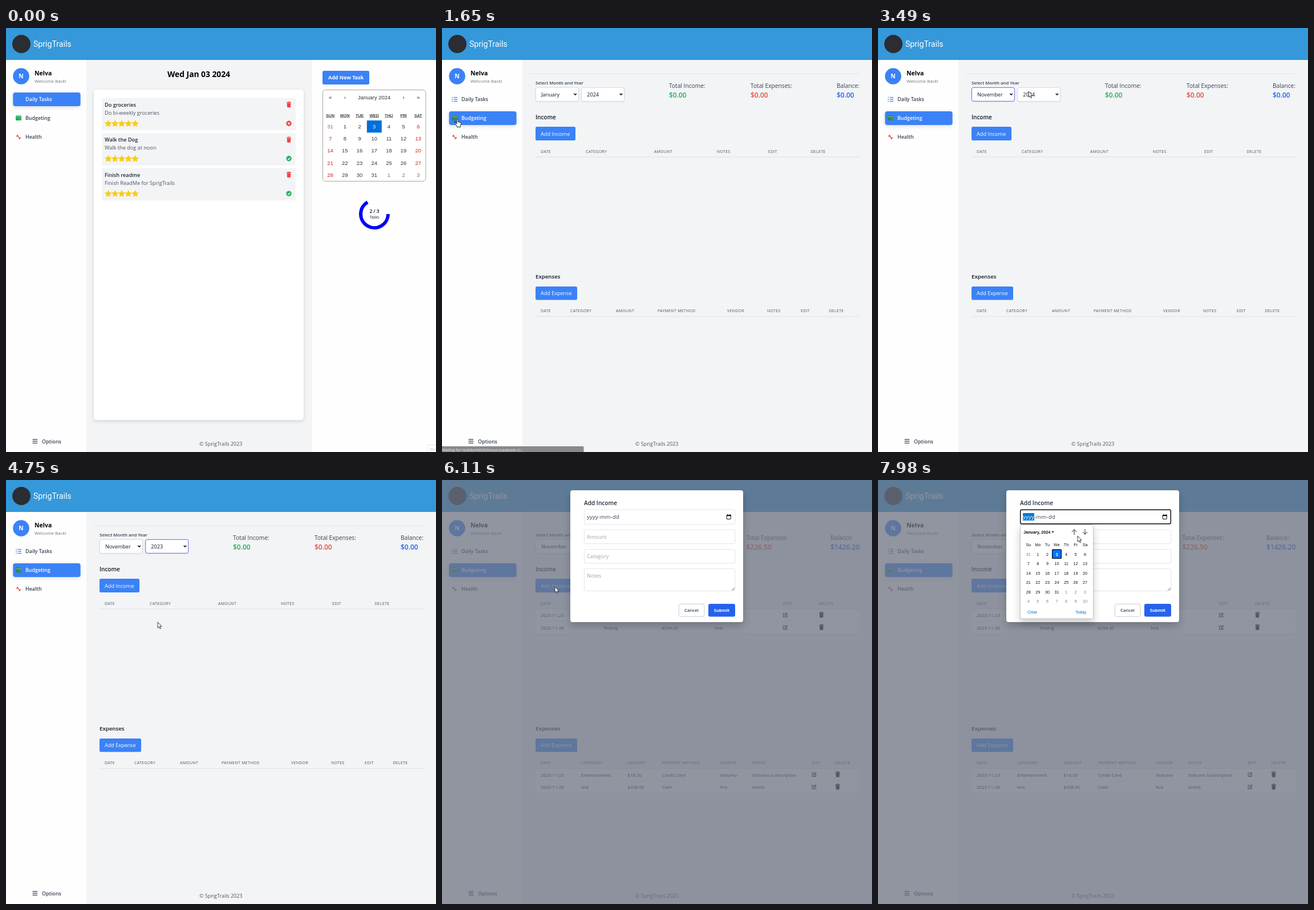
Write an HTML page that moves like this. It is 754 by 743 pixels and loops after 8 s.

```html
<!DOCTYPE html>
<html lang="en">
<head>
<meta charset="utf-8">
<title>SprigTrails</title>
<style>
  html, body { margin: 0; width: 100%; height: 100%; overflow: hidden; }
  svg { display: block; width: 100%; height: 100%; font-family: 'Open Sans', 'Noto Sans', sans-serif; }
  text { white-space: pre; }
  .cal { font-family: 'Liberation Sans', Arial, sans-serif; text-anchor: middle; }
  .faint { filter: drop-shadow(0 1px 1px #0001); }
  .soft { filter: drop-shadow(0 2px 3px #0002); }
  .deep { filter: drop-shadow(0 7px 7px #0003); }
</style>
</head>
<body>
<svg id="stage" viewBox="0 0 754 743"></svg>
<script>
const BLUE = '#3b82f6', DARK_BLUE = '#2563eb', GREY = '#f3f4f6', INK = '#374151',
  RED = '#e74c3c', GREEN = '#27ae60', BLACK = '#111827';

// Drawing helpers
const text = (x, y, s, size = 9.15, fill = INK, weight = 400, more = '') =>
  `<text x="${x}" y="${y}" font-size="${size}" fill="${fill}" font-weight="${weight}" ${more}>${s}</text>`;
const rect = (x, y, w, h, fill, r = 0, more = '') =>
  `<rect x="${x}" y="${y}" width="${w}" height="${h}" fill="${fill}" rx="${r}" ${more}/>`;
const circle = (x, y, r, fill, more = '') => `<circle cx="${x}" cy="${y}" r="${r}" fill="${fill}" ${more}/>`;
const path = (x, y, d, fill, stroke = 'none', w = 1) =>
  `<path transform="translate(${x} ${y})" d="${d}" fill="${fill}" stroke="${stroke}" stroke-width="${w}" stroke-linejoin="round"/>`;
const line = (x, y, w, fill = '#dfe2e6') => rect(x, y, w, 1, fill);
const group = (id, body) => `<g id="${id}">${body}</g>`;
const range = n => [...Array(n).keys()];

// Icons
const trash = (x, y, fill) => path(x, y, 'M-4-4.5h2.4l.6-.8h2l.6.8H4v1.3H-4zM-3.4-2.6H3.4L3 4Q2.9 5 2 5H-2Q-2.9 5-3 4z', fill);
const edit = (x, y) => path(x, y, 'M0-2.8H-3.4V3.6H3V1', 'none', '#111', 1.1) +
  path(x, y, 'M-1.4 1.8L-1.1 .1 2.7-3.7 4.2-2.2 .4 1.5z', '#111');
const star = (x, y) => path(x, y, 'M' + range(10).map(i => {
  const r = i % 2 ? 3 : 6, a = i * Math.PI / 5;
  return (r * Math.sin(a)).toFixed(2) + ' ' + (-r * Math.cos(a)).toFixed(2);
}).join('L') + 'z', '#facc15', '#facc15', .6);
const badge = (y, done) => circle(496, y, 4.7, done ? GREEN : RED) +
  path(496, y, done ? 'M-2 .2L-.5 1.7 2.2-1.4' : 'M-1.6-1.6L1.6 1.6M1.6-1.6L-1.6 1.6', 'none', '#fff', 1.3);
const tasksIcon = range(3).map(i => rect(21, 121 + i * 3.4, 6, 1.3, BLUE) +
  path(17, 121 + i * 3.4, 'M0 .5l1 1 1.8-2', 'none', BLUE)).join('');
const wallet = fill => rect(17, 153.5, 10, 8.5, fill, 1.2) + rect(18, 155, 9, .8, '#fff8') + circle(25, 159, .8, '#fff8');
const dumbbell = path(22, 191, 'M-2.2-2.2L2.2 2.2M-3.8-.8L-.8-3.8M.8 3.8L3.8.8', 'none', RED, 1.6);

// Shared parts
const header = rect(0, 0, 754, 56, '#3498db') + circle(27, 28, 16, '#2b2d33') +
  text(48, 33, 'SprigTrails', 14.1, '#fff', 400, 'font-family="Roboto, sans-serif"');
const navItem = (label, y, active) =>
  (active ? rect(12.3, y - 12, 118.3, 24, BLUE, 4, 'class="soft"') : '') +
  text(34, y + 3.3, label, 8.9, active ? '#fff' : INK, 600);
const side = rect(0, 56, 141, 687, '#fefefe') +
  circle(26.5, 84.5, 14.3, BLUE) + text(26.5, 88.3, 'N', 10.3, '#fff', 700, 'text-anchor="middle"') +
  text(50, 82.5, 'Nelva', 10.5, '#000', 700) + text(50, 96, 'Welcome Back!', 7.95, '#6b7280') +
  navItem('Health', 191) + dumbbell +
  range(3).map(i => rect(46.5, 720.3 + i * 3.2, 8.6, 1.4, '#5b4560')).join('') +
  text(63, 727.5, 'Options', 8.9, INK, 600);
const footer = text(339, 732.2, '© SprigTrails 2023', 8.95, '#4b5563');

// Daily tasks page
const task = (y, title, note, done) => rect(168, y, 340, 56.5, GREY, 2) +
  text(173, y + 15, title, 9.15, '#1f2937', 600) + text(173, y + 29, note, 9.15, '#4b5563') +
  range(5).map(i => star(179.3 + i * 11.8, y + 45)).join('') + trash(496, y + 11.5, '#ef4444') + badge(y + 44.5, done);

const monthPanel = () => {
  const cx = c => 568.6 + c * 25.7;
  const label = (x, y, s, size, fill, weight, more = '') => text(x, y, s, size, fill, weight, 'class="cal" ' + more);
  let s = rect(555.5, 108.5, 180.5, 160, '#fff', 5, 'stroke="#a6a6a0"') + label(645.7, 125, 'January 2024', 9.45, '#333');
  ['«', '‹', '', '', '', '›', '»'].forEach((c, i) => s += label(cx(i), 125, c, 9.5, '#333'));
  ['SUN', 'MON', 'TUE', 'WED', 'THU', 'FRI', 'SAT'].forEach((d, i) =>
    s += label(cx(i), 155.5, d, 7.1, '#444', 700, 'text-decoration="underline"'));
  s += rect(632.8, 162, 26, 21.3, '#006edc');
  range(35).forEach(i => {
    const c = i % 7, n = i ? (i - 1) % 31 + 1 : 31, other = !i || i > 31;
    const fill = i == 3 ? '#fff' : other ? '#757575' : c % 6 ? '#333' : '#d1201a';
    s += label(cx(c), 175.5 + (i / 7 | 0) * 21.35, n, 9.45, fill);
  });
  return s;
};

const ringEnd = [646 + 24 * Math.cos(Math.PI * 4 / 3), 326 + 24 * Math.sin(Math.PI * 4 / 3)];
const home = rect(141, 56, 396, 687, GREY) + text(338, 85.5, 'Wed Jan 03 2024', 13.8, '#000', 700, 'text-anchor="middle"') +
  rect(154, 108, 368, 579, '#fff', 5, 'class="soft"') +
  task(122.7, 'Do groceries', 'Do bi-weekly groceries', false) +
  task(184.3, 'Walk the Dog', 'Walk the dog at noon', true) +
  task(245.6, 'Finish readme', 'Finish ReadMe for SprigTrails', true) +
  rect(555, 75, 82, 24, BLUE, 2.5) + text(565, 90.3, 'Add New Task', 8.95, '#fff', 700) + monthPanel() +
  `<path d="M670 326A24 24 0 1 1 ${ringEnd}" fill="none" stroke="#00f" stroke-width="6"/>` +
  text(646, 324, '2 / 3', 8.4, BLACK, 600, 'text-anchor="middle"') + text(646, 334.3, 'Tasks', 6.5, BLACK, 400, 'text-anchor="middle"') +
  navItem('Daily Tasks', 125, true) + navItem('Budgeting', 158) + wallet(GREEN);

// Budget page
const select = (id, x) => rect(x, 104.3, 75, 24, '#fff', 3, `id="${id}Box" class="faint"`) +
  text(x + 9.6, 120, '', 9.15, BLACK, 400, `id="${id}"`) + path(x + 69.3, 116, 'M-2.2-1.2L0 1.2 2.2-1.2', 'none', '#111', 1.5);
const totals = (xs, values) => ['Total Income:', 'Total Expenses:', 'Balance:'].map((s, i) =>
  text(xs[i], 105, s, 10.2, INK) + text(xs[i], 122, values[i], 12, [GREEN, RED, DARK_BLUE][i], 600)).join('');
const table = (y, xs, heads, rows) => heads.map((h, i) =>
    text(xs[i], y - 7.3, h, 6.9, '#4b5563', 500, 'letter-spacing=".35"')).join('') +
  rows.map((row, r) => {
    const top = y + r * 21.7;
    return rect(164, top, 568, 21.7, '#fff') + line(164, top + 21.2, 568, '#e5e7eb') +
      row.map((s, i) => text(xs[i], top + 14.2, s, 7.8, BLACK)).join('') +
      edit(xs[row.length] + 4, top + 10.3) + trash(xs[row.length + 1] + 4.3, top + 10.2, '#111');
  }).join('') + line(164, y - .5, 568);
const incomeHeads = ['DATE', 'CATEGORY', 'AMOUNT', 'NOTES', 'EDIT', 'DELETE'];
const expenseHeads = ['DATE', 'CATEGORY', 'AMOUNT', 'PAYMENT METHOD', 'VENDOR', 'NOTES', 'EDIT', 'DELETE'];

const budget = rect(141, 56, 613, 687, GREY) + line(153, 79.5, 579, '#e5e7eb') +
  text(164, 99, 'Select Month and Year', 7.75, INK, 600) + select('month', 164.3) + select('year', 244.7) +
  text(164, 159.5, 'Income', 10, BLACK, 600) + text(164, 439, 'Expenses', 9.7, BLACK, 600) +
  rect(164, 173, 70, 24, BLUE, 2.5, 'id="add"') + text(173, 188.5, 'Add Income', 9.2, '#fff') +
  rect(164, 453, 73, 23.5, BLUE, 2.5) + text(173, 468, 'Add Expense', 9.05, '#fff') +
  tasksIcon + navItem('Daily Tasks', 125) + navItem('Budgeting', 158, true) + wallet('#2c8a5c');
const empty = totals([398, 541, 692], ['$0.00', '$0.00', '$0.00']) +
  table(226, [173, 252, 372, 482, 572, 646.5], incomeHeads, []) +
  table(505.5, [173, 225, 305, 378, 500, 570, 629, 678.5], expenseHeads, []);
const loaded = totals([394, 533.5, 681], ['$1652.70', '$226.50', '$1426.20']) +
  table(226, [173, 283, 385, 478.5, 598, 661], incomeHeads, [
    ['2023-11-23', 'Payroll', '$1448.50', 'Main Income'],
    ['2023-11-28', 'Testing', '$204.20', 'test']]) +
  table(505.5, [173, 244, 325.5, 386, 487, 544, 648.5, 689.5], expenseHeads, [
    ['2023-11-23', 'Entertainment', '$18.50', 'Credit Card', 'Vidlumo', 'Vidlumo Subscription'],
    ['2023-11-28', 'test', '$208.00', 'Cash', 'N/a', 'testttt']]);

// Dialog
const field = (y, h, label) => rect(249.4, y + .4, 264.4, h, '#fff', 2, 'stroke="#e2e5ea"') +
  text(254, y + 16, label, 9.2, '#9ca3af');
const dialog = rect(0, 0, 754, 743, 'rgb(107,114,128)', 0, 'opacity=".75"') +
  rect(225, 18, 303, 231, '#fff', 4, 'class="deep"') + text(249, 44, 'Add Income', 10.1, '#1f2937', 600) +
  field(51.5, 25.5, '') + field(86.7, 24.5, 'Amount') + field(121, 24.5, 'Category') + field(155, 39, 'Notes') +
  path(513, 193.5, 'M-5 0L0-5M-2.5 0L0-2.5', 'none', '#555', .8) +
  text(254, 68.3, 'yyyy-mm-dd', 9.5, INK, 400, 'letter-spacing=".25"') +
  rect(499.3, 61.5, 7, 7, 'none', .5, 'stroke="#111"') + rect(499, 61, 8, 2.2, '#111') +
  rect(500.3, 59.8, 1, 2, '#111') + rect(504.7, 59.8, 1, 2, '#111') +
  rect(415.4, 217.3, 44.6, 22, '#fff', 3, 'stroke="#c9cdd3"') + text(437.5, 231.3, 'Cancel', 7.8, INK, 600, 'text-anchor="middle"') +
  rect(467, 217, 47, 22.5, DARK_BLUE, 3) + text(490.5, 231.3, 'Submit', 7.7, '#fff', 700, 'text-anchor="middle"');

const pickerPanel = () => {
  const cx = c => 263.8 + c * 16.55;
  const label = (x, y, s, fill = '#111', weight = 400) => text(x, y, s, 7.2, fill, weight, 'class="cal"');
  let s = rect(249.7, 52.2, 263.6, 24.6, 'none', 2, 'stroke="#111" stroke-width="1.5"') +
    rect(254, 58, 20, 13, '#0078d7') + text(254, 68.3, 'yyyy', 9.5, '#fff', 400, 'letter-spacing=".25"') +
    rect(249.5, 78.5, 128, 164.5, '#fff', 2, 'class="deep" stroke="#c4c4c4"') +
    label(278.7, 94, 'January, 2024', '#111', 700) + path(306.5, 91, 'M-2.2-1.2H2.2L0 1.4z', '#111') +
    path(344, 91, 'M0 5V-4M-4 0L0-4.3 4 0', 'none', '#222') + path(363, 91, 'M0-5V4M-4 0L0 4.3 4 0', 'none', '#222');
  ['Su', 'Mo', 'Tu', 'We', 'Th', 'Fr', 'Sa'].forEach((d, i) => s += label(cx(i), 115.5, d));
  s += rect(305.6, 121.8, 15.8, 15.6, '#0075ff', 1, 'stroke="#101010" stroke-width="1.3"');
  range(42).forEach(i => s += label(cx(i % 7), 132.6 + (i / 7 | 0) * 16.55, i ? (i - 1) % 31 + 1 : 31,
    i == 3 ? '#fff' : !i || i > 31 ? '#808080' : '#111', i == 3 ? 700 : 400));
  return s + label(270.5, 233.5, 'Clear', '#0070d0') + label(355.5, 233.5, 'Today', '#0070d0');
};

// Open drop-down list with the row under the pointer lit
const ROW = 14.8, LIST_TOP = 128.5;
const list = (x, w, items, row) => rect(x, LIST_TOP, 75.2, items.length * ROW + 1, '#fff', 0, 'stroke="#8a8a8a" stroke-width=".8"') +
  rect(x + .5, LIST_TOP + row * ROW + .5, w, ROW, '#1967d2') +
  items.map((s, i) => text(x + 9.6, LIST_TOP + i * ROW + 11, s, 9.15, i == row ? '#fff' : '#111')).join('') +
  (w < 70 ? rect(x + 65, LIST_TOP + .5, 10, items.length * ROW, '#f1f1f1') + rect(x + 67, 210, 6, 95, '#c1c1c1') : '');
const months = ['January', 'February', 'March', 'April', 'May', 'June', 'July', 'August', 'September', 'October', 'November', 'December'];
const years = range(19).map(i => 2015 + i);

const arrow = path(0, 0, 'M0 0V10.2L2.3 8 3.9 11.8 5.6 11 4 7.4H7z', '#fff', '#111', .8);
const hand = path(0, 0, 'M-1 0Q.2-1.2 1.2 0V4.5L5.6 5.6Q6.6 6 6.4 7.4L5.4 11.5V13.5H-.8V12L-4 7.6Q-4-.2-3 6.2L-1 8z', '#fff', '#111', .9);

stage.innerHTML = rect(0, 0, 754, 743, '#fefefe') + side + group('homePage', home) +
  group('budgetPage', budget + group('emptyData', empty) + group('loadedData', loaded)) + footer + header +
  group('corner', rect(739.5, 730.5, 20, 18, '#fff', 1, 'stroke="#e5e5e5"') + text(743, 741, 'Rec', 6.5, '#c5c5c5')) +
  group('status', rect(-3, 733, 251.5, 13, '#868a8c', 2) + text(0, 741.5, 'Waiting for nxslskymdisttzisvxuv.supabase.co...', 6.55, '#f0f0f0')) +
  group('drop', '') + group('dialogLayer', dialog) + group('picker', pickerPanel()) +
  group('pointer', circle(0, 2, 7, '#d8c820', 'id="press" opacity=".65"') + group('arrowShape', arrow) + group('handShape', hand));

const $ = id => document.getElementById(id);
const show = (id, on) => $(id).style.display = on ? '' : 'none';

// Pointer stops: time, x, y
const stops = [[70, 740, 735], [450, 330, 430], [830, 36, 199], [1000, 27, 160], [1650, 27, 160], [2080, 284, 126], [2470, 206, 118],
  [2620, 206, 118], [2990, 206, 287], [3070, 206, 287], [3350, 257, 118], [3490, 264, 111], [3630, 264, 111], [4090, 266, 270],
  [4200, 267, 283], [4420, 266, 249], [4770, 266, 249], [5020, 523, 212], [5290, 523, 212], [5560, 340, 152], [5910, 198, 187],
  [6140, 198, 187], [6780, 503, 64], [7010, 503, 64], [7600, 378, 88], [7710, 378, 88], [7930, 350, 98]];
const presses = [1130, 2560, 3040, 3560, 4600, 6050, 6880];

const pointerAt = t => {
  const i = stops.findIndex(s => s[0] > t);
  if (i < 1) return i ? stops.at(-1).slice(1) : stops[0].slice(1);
  const [a, x, y] = stops[i - 1], [b, x2, y2] = stops[i];
  const u = (t - a) / (b - a), e = u * u * (3 - 2 * u);
  return [x + (x2 - x) * e, y + (y2 - y) * e];
};

function draw(t) {
  const [x, y] = pointerAt(t), on = (a, b) => t >= a && t < b;
  const inside = (l, top, r, bottom) => x > l && x < r && y > top && y < bottom;
  const budgetOn = t >= 1300, dataOn = t >= 4950, dialogOn = t >= 6110;
  show('homePage', !budgetOn);
  show('budgetPage', budgetOn);
  show('emptyData', !dataOn);
  show('loadedData', dataOn);
  show('corner', t < 70);
  show('status', on(1440, 2200));
  show('dialogLayer', dialogOn);
  show('picker', t >= 6940);

  $('month').textContent = t < 3080 ? 'January' : 'November';
  $('year').textContent = t < 4680 ? '2024' : '2023';
  $('monthBox').setAttribute('stroke', on(2600, 3560) ? '#6366f1' : '#d5d9df');
  $('yearBox').setAttribute('stroke', on(3560, 4950) ? '#6366f1' : '#d5d9df');
  const row = Math.floor((y + 1 - LIST_TOP) / ROW);
  $('drop').innerHTML = on(2600, 3080) ? list(164.3, 74.2, months, Math.max(row, 0))
    : on(3600, 4680) ? list(244.7, 64.5, years, row < 0 ? 9 : row) : '';

  const overAdd = !dialogOn && t > 5000 && inside(164, 173, 234, 197);
  $('add').setAttribute('fill', overAdd ? DARK_BLUE : BLUE);
  const useHand = overAdd || t < 2000 && inside(12, 113, 131, 203);
  show('pointer', t >= 70);
  show('handShape', useHand);
  show('arrowShape', !useHand);
  show('press', presses.some(p => on(p, p + 60)));
  $('pointer').setAttribute('transform', `translate(${x} ${y})`);
}

const start = performance.now();
(function tick() {
  draw((performance.now() - start) % 8000);
  requestAnimationFrame(tick);
})();
</script>
</body>
</html>
```
